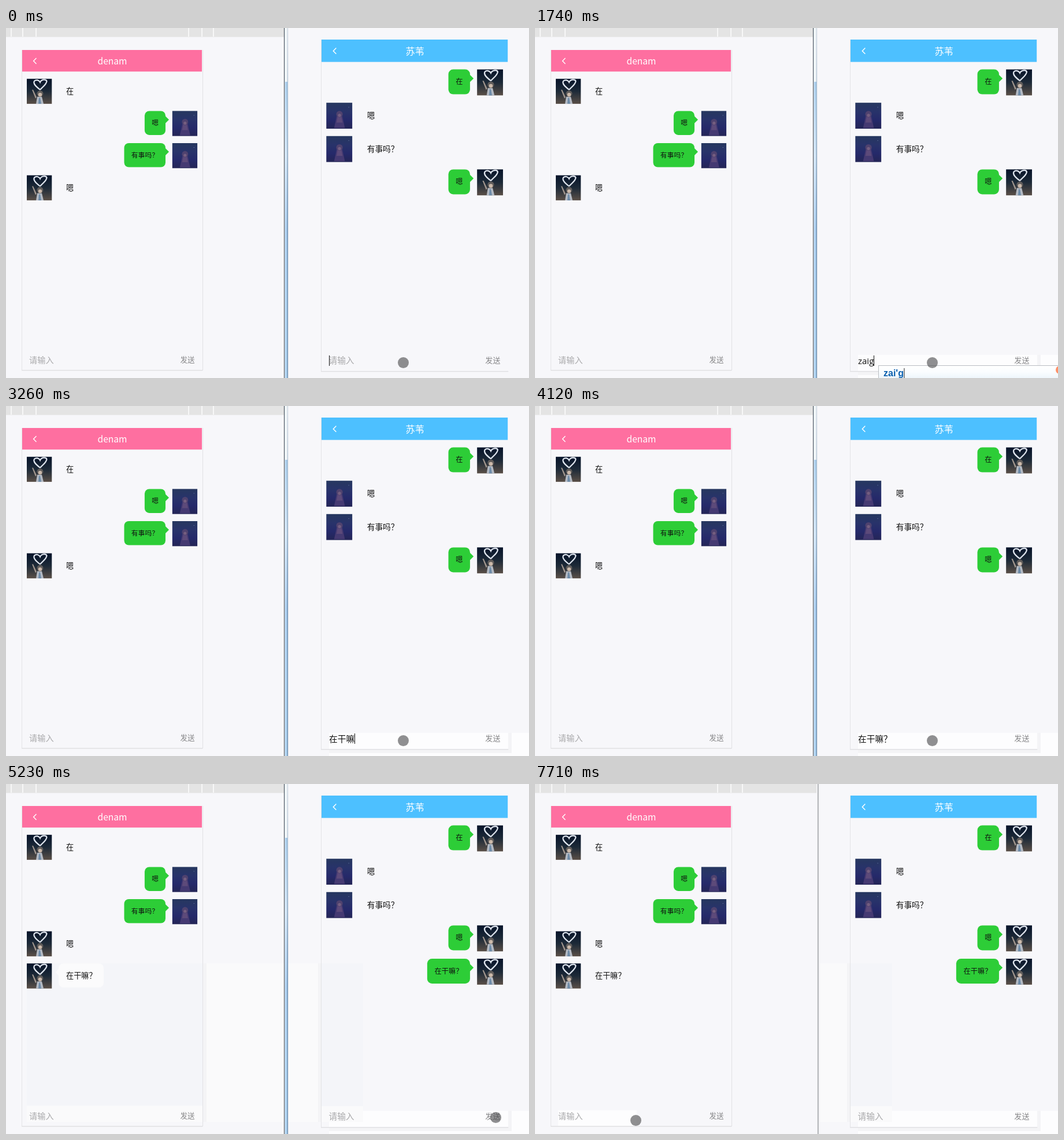
Write an HTML page with a canvas that moves like this. It is 905 px wide and 605 px high and loops after 8000 ms.

```html
<!DOCTYPE html>
<html lang="zh-CN">
<head>
<meta charset="utf-8">
<title>Chat</title>
<style>
html, body { margin: 0; width: 100%; height: 100%; overflow: hidden; background: #f7f7fa; }
canvas { display: block; width: 905px; height: 605px; }
</style>
</head>
<body>
<canvas id="stage" width="905" height="605"></canvas>
<script>
const LOOP = 8000;
const ctx = document.getElementById('stage').getContext('2d');
const CJK = '"Noto Sans CJK SC", "Noto Sans CJK", sans-serif';
// This cut centres the full-width question mark
const SPEECH = '"Noto Sans CJK JP", "Noto Sans CJK", sans-serif';
const LATIN = '"Open Sans", "Noto Sans", sans-serif';
const BG = '#f7f7fa', SHADE = '#f4f4f6', TINT = '#f4f5f9', PALE = '#fafafb', WHITE = '#fdfdfe';

// [start, x, y] of the pointer; no position means hidden
const POINTER = [
  [0, 687.5, 578.5], [1880], [2280, 687.5, 596.5], [2430], [3260, 687.5, 578.5],
  [3540], [3810, 687.5, 578.5], [4400, 794.5, 591.5], [4550, 835.5, 580.5],
  [4700, 847.5, 576.5], [6070, 660, 588], [6200, 465.5, 595.5], [6350, 128.5, 550.5],
  [6500, 126.5, 570], [6620, 157.5, 585.5], [6760, 152.5, 582.5],
  [7590, 166.5, 581.5], [7710, 174.5, 581.5]
];
// [start, text in the right field, caret shown]
const TYPING = [
  [0, '', 1], [410, '', 0], [860, 'z', 1], [990, 'za', 1], [1140, 'zai', 1],
  [1740, 'zaig', 1], [1880, 'zaiga', 1], [2000, 'zaigan', 1], [2430, 'zaiganma', 1],
  [2860, 'zaiganma', 0], [3260, '在干嘛', 1], [3540, '在干嘛？', 1],
  [4120, '在干嘛？', 0], [4700, '在干嘛？', 1], [5230, '', 0]
];
// [start, left edge, composed text]
const POPUP = [
  [0], [860, 573, 'z'], [990, 573, 'za'], [1140, 573, 'zai'], [1740, 594, "zai'g"],
  [1880, 602, "zai'ga"], [2000, 610, "zai'gan"], [2430, 610, "zai'gan'ma"], [3260]
];
const CHAT = [['在', 1], ['嗯', 0], ['有事吗？', 0], ['嗯', 1], ['在干嘛？', 1]];

const at = (steps, t) => steps.reduce((cur, s) => s[0] <= t ? s : cur);

function box(x1, y1, x2, y2, color) {
  ctx.fillStyle = color;
  ctx.fillRect(x1, y1, x2 - x1, y2 - y1);
}

function shape(color, ...pts) {
  ctx.fillStyle = color;
  ctx.beginPath();
  for (let i = 0; i < pts.length; i += 2) ctx.lineTo(pts[i], pts[i + 1]);
  ctx.fill();
}

function disc(x, y, r, color) {
  ctx.fillStyle = color;
  ctx.beginPath();
  ctx.arc(x, y, r, 0, 7);
  ctx.fill();
}

// cy is the visual middle of the line
function label(s, x, cy, size, color, align = 'left', font = CJK, weight = 400) {
  ctx.font = `${weight} ${size}px ${font}`;
  ctx.textAlign = align;
  ctx.fillStyle = color;
  ctx.fillText(s, x, cy + size * 0.38);
  return ctx.measureText(s).width;
}

function fade(y1, y2, ...colors) {
  const g = ctx.createLinearGradient(0, y1, 0, y2);
  colors.forEach((c, i) => g.addColorStop(i / (colors.length - 1), c));
  return g;
}

function heartAvatar() {
  box(0, 0, 43.3, 43.3, fade(0, 43.3, '#07142a', '#1d2a38', '#5a4f47'));
  ctx.strokeStyle = '#dfe5ee';
  ctx.lineWidth = 2.2;
  ctx.beginPath();
  ctx.moveTo(23, 19);
  ctx.bezierCurveTo(18, 15, 10, 9, 13, 4);
  ctx.bezierCurveTo(16, 1, 21, 2, 23, 6);
  ctx.bezierCurveTo(25, 1, 33, 0, 34.5, 4);
  ctx.bezierCurveTo(34, 10, 28, 13, 23, 19);
  ctx.stroke();
  shape('#a2978f', 9, 19, 11, 19, 17, 32, 15, 34);
  shape('#b4bac3', 18, 31, 26, 31, 29, 43.3, 16, 43.3);
  shape('#6d8ba8', 21, 33, 23, 33, 25, 43.3, 20, 43.3);
  disc(23, 25.5, 5.4, '#5f5c5b');
  disc(23, 27.5, 3.2, '#cbb9aa');
}

function nightAvatar() {
  box(0, 0, 43.3, 43.3, fade(0, 43.3, '#26375f', '#28336a', '#25296a', '#242556'));
  shape('#453a72', 18, 19, 26, 19, 31, 42, 13, 42);
  shape('#5d4a7a', 19, 22, 25, 22, 27, 33, 17, 33);
  disc(22, 19, 5.4, '#4f426f');
  disc(22, 21, 2.6, '#755e80');
  box(37, 7, 38, 8, '#7484ac');
}

function bubble(x1, x2, tip, color) {
  ctx.fillStyle = color;
  ctx.beginPath();
  ctx.roundRect(x1, 0, x2 - x1, 41.5, 8);
  ctx.fill();
  const edge = tip > x2 ? x2 - 0.5 : x1 + 0.5;
  shape(color, edge, 8.5, tip, 15, edge, 21.5);
}

function phone(x, y, scale, color, title, me, count, glow, field) {
  ctx.save();
  ctx.translate(x, y);
  ctx.scale(scale, scale);
  box(-0.9, 0, 0, 554, '#e2e2e5');
  box(-0.9, 553, 312, 554.4, '#dfdfe2');
  if (!me) box(312, 0, 313, 554, '#e2e2e5');
  box(0, 0, 311, 37.3, color);
  ctx.strokeStyle = '#fff';
  ctx.lineWidth = 1.4;
  ctx.beginPath();
  ctx.moveTo(24.5, 14);
  ctx.lineTo(19.6, 19);
  ctx.lineTo(24.5, 24);
  ctx.stroke();
  label(title, 156, 19.3, 15.6, '#fff', 'center', CJK, 500);

  CHAT.slice(0, count).forEach(([msg, who], i) => {
    const mine = who === me;
    ctx.save();
    ctx.translate(0, 49.8 + 55.6 * i);
    if (mine) {
      const left = 248 - msg.length * 11.8 - 24.3;
      bubble(left, 248, 254, '#2dcd37');
      label(msg, left + 12.3, 20.5, 11.8, '#101410', 'left', SPEECH);
    } else {
      if (glow && i === 4) bubble(63, 141, 58, '#fbfbfc');
      label(msg, 76, 21, 13.2, '#111', 'left', SPEECH);
    }
    ctx.translate(mine ? 259.8 : 8, 0);
    (who ? heartAvatar : nightAvatar)();
    ctx.restore();
  });

  if (!field) label('请输入', 12, 535.6, 14.2, '#a9a9ab');
  label('发送', 273.5, 535.2, 12.6, '#858587');
  ctx.restore();
}

function divider(moved) {
  const end = moved ? 487 : 481;
  box(0, 0, end, 15.5, '#e4e4e4');
  for (const x of [8, 28, 51, 315, 338, 358]) box(x, 0, x + 2, 15, '#f7f7f7');
  if (moved) {
    box(487, 0, 493, 605, '#f3f3f5');
    box(489, 0, 490, 605, '#a4a6aa');
    box(490, 0, 491, 605, '#c4c6c9');
    return;
  }
  box(481, 0, 482, 605, '#40464e');
  box(482, 0, 487, 93, '#eef3f8');
  box(482, 93, 487, 605, fade(93, 605, '#a8cbe9', '#cfe2f3', '#a6c9ea', '#a9cdec', '#a9cdec'));
  box(482, 0, 483, 605, '#e6f1fa');
  box(487, 0, 488, 605, fade(0, 290, '#c3ced8', '#8fa9c0', '#56789a'));
}

// Faint lighter areas behind the phones
function patches(t) {
  if (t >= 860) {
    const right = t < 1740 ? 899 : 905;
    box(559, 565, right, 605, WHITE);
    box(869, 565, 875, 600, SHADE);
    box(559, 594, 875, 600, SHADE);
  }
  if (t < 5230) return;
  box(488, 310, 540, 584, PALE);
  box(540, 310, 545, 584, SHADE);
  box(545, 310, 618, 557, TINT);
  box(545, 557, 618, 584, PALE);
  if (t < 7160) {
    box(36, 310, 340, 556, TINT);
    box(36, 556, 340, 584, PALE);
    box(340, 310, 347, 584, SHADE);
    box(347, 310, 481, 584, PALE);
    if (t >= 6350) {
      box(115, 556, 340, 592, WHITE);
      box(117, 592, 346, 599, SHADE);
      box(340, 541, 346, 599, SHADE);
      box(346, 541, 468, 605, '#fbfbfd');
      box(117, 599, 468, 605, '#fbfbfd');
    }
  } else if (t >= 7590) {
    box(40, 564, 176, 591, WHITE);
  }
}

function popup(t) {
  const [, x, s] = at(POPUP, t);
  if (!x) return;
  const right = x + 326;
  box(x, 583, right, 605, '#b9bdc2');
  box(x + 1, 584, right - 1, 605, fade(584, 605, '#ffffff', '#fafdff', '#eef6fc'));
  const w = label(s, x + 9, 596.2, 16, '#0a5fae', 'left', '"Liberation Sans", sans-serif', 700);
  box(x + 9.5 + w, 588, x + 10.5 + w, 605, '#222');
  disc(right - 12, 591, 7, '#ff9068');
}

function draw(t) {
  box(0, 0, 905, 605, BG);
  patches(t);
  divider(t >= 7160);
  const [, text, caret] = at(TYPING, t);
  phone(28, 38, 1, '#fe6fa0', 'denam', 0, t < 5230 ? 4 : 5, t < 7160, '');
  phone(546, 20, 1.036, '#4dc0ff', '苏苇', 1, t < 5110 ? 4 : 5, false, text);

  const latin = /^[a-z]/.test(text);
  const w = text ? label(text, 559, 575, latin ? 15 : 14.7, '#111', 'left', latin ? LATIN : SPEECH) : 0;
  if (caret) box(Math.round(559 + w), 566, Math.round(560 + w), 584, '#111');
  if (t >= 7160 && t < 7590) box(40, 565, 41, 583, '#111');
  popup(t);

  const [, px, py] = at(POINTER, t);
  if (px) disc(px, py, 9.5, 'rgba(70,70,72,.6)');
}

const start = performance.now();
function frame() {
  draw((performance.now() - start) % LOOP);
  requestAnimationFrame(frame);
}
frame();
</script>
</body>
</html>
```
